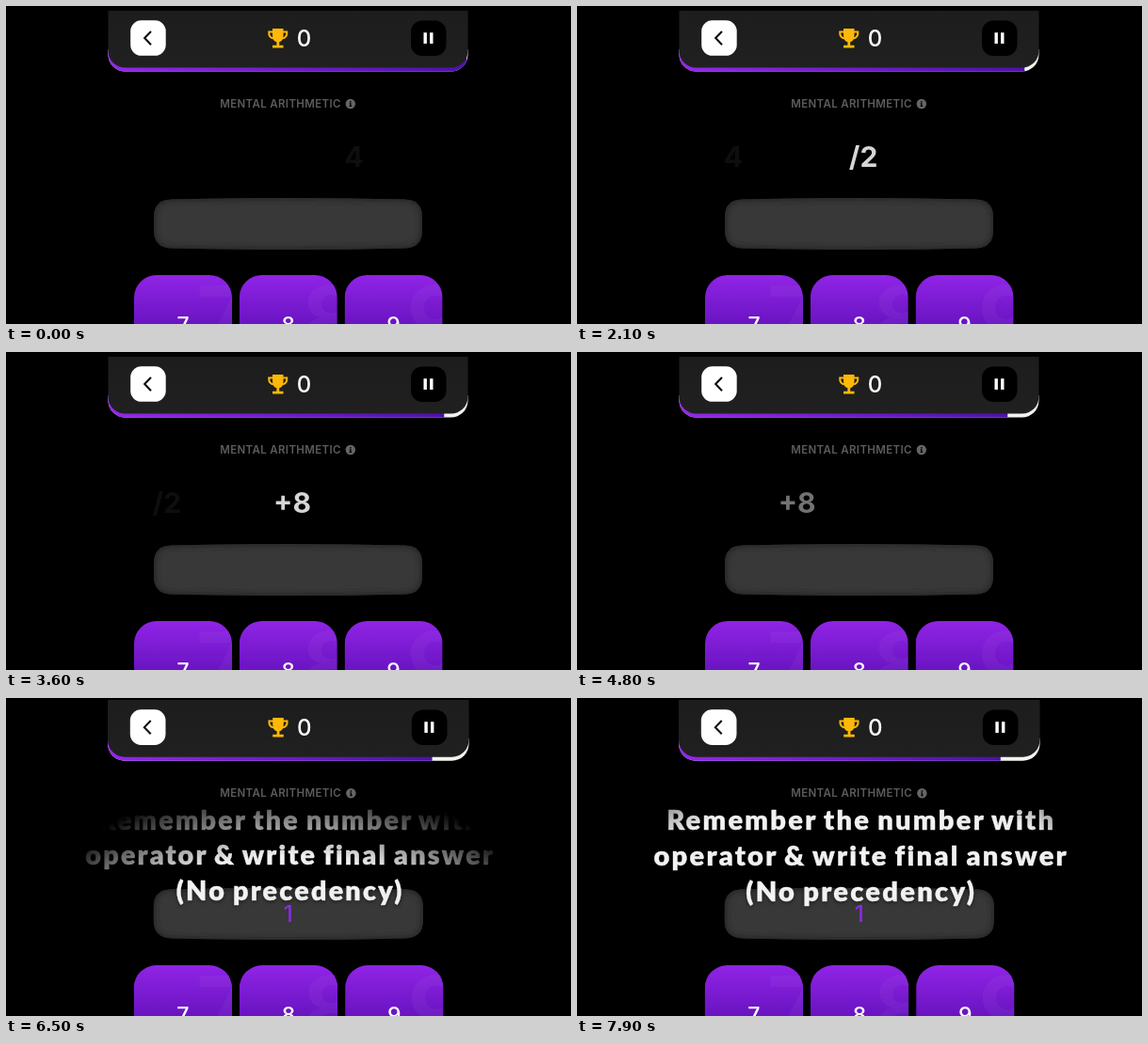
An HTML page for the animation above (8000 ms loop, 600 px wide and 338 px high).

```html
<!DOCTYPE html>
<html lang="en">
<head>
<meta charset="utf-8">
<title>Mental arithmetic</title>
<style>
html, body { margin: 0; width: 100%; height: 100%; overflow: hidden; background: #000; }
svg { display: block; width: 100vw; height: 100vh; font-family: Inter, sans-serif; }
.term { font-size: 30px; font-weight: 700; fill: #e4e4e4; }
.key { font-size: 23px; font-weight: 500; fill: #fff; text-anchor: middle; }
.ghost { font-size: 97px; font-weight: 700; fill: #fff; opacity: .04; }
.caption { font: 900 29px Lato, sans-serif; letter-spacing: 2.3px; word-spacing: -2px; fill: #fff;
  stroke: #fff; stroke-width: .4; text-anchor: middle; text-shadow: 0 1px 4px #0008; }
</style>
</head>
<body>
<svg viewBox="0 0 600 338">
  <defs>
    <linearGradient id="bar"><stop stop-color="#9427e8"/><stop offset="1" stop-color="#4e10ae"/></linearGradient>
    <linearGradient id="panel" x2="0" y2="1"><stop stop-color="#1d1d1d"/><stop offset="1" stop-color="#202020"/></linearGradient>
    <linearGradient id="keyFill" gradientUnits="userSpaceOnUse" x1="0" x2="0" y1="286" y2="390">
      <stop stop-color="#9024e6"/><stop offset=".5" stop-color="#6a14c2"/><stop offset="1" stop-color="#5410a4"/>
    </linearGradient>
    <radialGradient id="reveal" gradientUnits="userSpaceOnUse" cx="300" cy="460" r="245">
      <stop id="solid" stop-color="#fff"/><stop offset="1" stop-color="#fff" stop-opacity="0"/>
    </radialGradient>
    <mask id="wipe" maskUnits="userSpaceOnUse" x="0" y="0" width="600" height="338">
      <rect width="600" height="338" fill="url(#reveal)"/>
    </mask>
    <path id="field" d="M157 224Q157 206 176 205.5Q300 202.5 423 205.5Q442 206 442 224V239Q442 257 423 257.5Q300 260.5 176 257.5Q157 257 157 239Z"/>
    <clipPath id="fieldClip"><use href="#field"/></clipPath>
    <path id="rim" d="M108.5 46V51.5A18 18 0 0 0 126.5 69.5H472.5A18 18 0 0 0 490.5 51.5V46Z"/>
    <clipPath id="rimClip"><use href="#rim"/></clipPath>
    <filter id="soft" x="-10%" y="-30%" width="120%" height="160%"><feGaussianBlur stdDeviation="2.5"/></filter>
  </defs>

  <g id="screen">
    <use href="#rim" fill="#f4f2ee"/>
    <rect id="progress" x="108" y="45" width="381" height="25" fill="url(#bar)" clip-path="url(#rimClip)"/>
    <path d="M108.5 5H490.5V47.5A18 18 0 0 1 472.5 65.5H126.5A18 18 0 0 1 108.5 47.5Z" fill="url(#panel)"/>
    <rect x="132.2" y="15.3" width="37.5" height="37.5" rx="11.5" fill="#fff"/>
    <path d="M154 27L147.2 34.1L154 41.2" fill="none" stroke="#111" stroke-width="2.1"/>
    <g fill="#ffb808">
      <path d="M283 24h11.5v7.5q-.5 7-5.75 7t-5.75-7zM287.4 37.5h2.8v4.3h4.3v2.7h-11.5v-2.7h4.4z"/>
      <path d="M284 27.4h-4.8q-.4 6.6 5.3 7M293.5 27.4h4.8q.4 6.6-5.3 7" fill="none" stroke="#ffb808" stroke-width="2"/>
    </g>
    <text x="316.5" y="43.2" font-size="24" font-weight="500" fill="#fff" text-anchor="middle">0</text>
    <rect x="430" y="15.5" width="37.5" height="37.5" rx="12" fill="#000"/>
    <path d="M443.5 28.3h3.4v11.7h-3.4zM450.1 28.3h3.4v11.7h-3.4z" fill="#fff"/>

    <text x="227.2" y="108.1" font-size="11.5" font-weight="600" letter-spacing=".35" fill="#5c5c5c">MENTAL ARITHMETIC</text>
    <circle cx="365.8" cy="104" r="5.2" fill="#666"/>
    <path d="M365.1 101h1.5v1.4h-1.5zM364.6 103.2h2v2.8h.7v1h-2.8v-1h.7v-1.8h-.6z" fill="#000"/>

    <g id="terms"></g>
    <use href="#field" fill="#383838"/>
    <use href="#field" fill="none" stroke="#262626" stroke-width="5" filter="url(#soft)" clip-path="url(#fieldClip)"/>
    <text id="answer" x="299.5" y="240.5" font-size="24" font-weight="500" fill="#8a2be2" text-anchor="middle">1</text>
    <g id="keys"></g>
  </g>

  <g mask="url(#wipe)">
    <g id="caption" class="caption">
      <text x="301.7" y="139.5">Remember the number with</text>
      <text x="301.7" y="177.5">operator &amp; write final answer</text>
      <text x="301.7" y="215.5">(No precedency)</text>
    </g>
  </g>
</svg>
<script>
const $ = id => document.getElementById(id);
const LOOP = 8000, STEP = 100, CUT = 5300;
const PERIOD = 1500, SLIDE = 850, FIRST = -125, MID = 299.7;
const WIPE = [[CUT, 245], [5700, 308], [6500, 378], [7100, 426], [7900, 452]], SOFT = 85;

const smooth = u => {
  u = Math.min(1, Math.max(0, u));
  return u * u * (3 - 2 * u);
};

function along(points, t) {
  const i = points.findIndex(p => p[0] >= t);
  if (i < 0) return points[points.length - 1][1];
  if (i === 0) return points[0][1];
  const [t0, a] = points[i - 1], [t1, b] = points[i];
  return a + (b - a) * (t - t0) / (t1 - t0);
}

$('keys').innerHTML = [7, 8, 9].map((n, i) => {
  const x = 136 + 111.8 * i;
  return `<clipPath id="k${n}"><rect x="${x}" y="286" width="104" height="104" rx="24"/></clipPath>
    <g clip-path="url(#k${n})"><rect x="${x}" y="286" width="104" height="104" fill="url(#keyFill)"/>
    <text class="ghost" x="${x + 66}" y="367.5">${n}</text>
    <text class="key" x="${x + 52}" y="346.5">${n}</text></g>`;
}).join('');

$('terms').innerHTML = ['4', '/2', '+8'].map(s => `<text class="term" y="170.5">${s}</text>`).join('');
const terms = [...$('terms').children];

// Each term slides in from the right, rests, then leaves to a left-aligned spot.
function placeTerm(el, i, t) {
  const age = t - FIRST - i * PERIOD;
  const enter = smooth(age / SLIDE), leave = smooth((age - PERIOD) / SLIDE);
  const rest = MID - el.getComputedTextLength() / 2;
  el.setAttribute('x', rest + 74 * (1 - enter) + (147.5 - rest) * leave);
  el.setAttribute('opacity', enter * (1 - leave));
}

function draw(t) {
  const slow = t >= CUT;
  $('screen').setAttribute('transform', slow ? 'matrix(1.004 0 0 1.004 -.9 -3.1)' : '');
  const end = 489.3 - Math.min(t, CUT) / 150 - Math.max(0, t - CUT) * .00195;
  $('progress').setAttribute('width', end - 108);
  $('answer').setAttribute('opacity', t >= CUT - 100 ? 1 : 0);
  terms.forEach((el, i) => placeTerm(el, i, t));

  const r = along(WIPE, t);
  $('reveal').setAttribute('r', r);
  $('solid').setAttribute('offset', (r - SOFT) / r);
  const zoom = 1 - .02 * (7900 - t) / 2200;
  $('caption').setAttribute('transform', `translate(300.5 168) scale(${zoom}) translate(-300.5 -168)`);
  $('caption').setAttribute('opacity', slow ? 1 : 0);
}

function tick() {
  draw(Math.floor(performance.now() % LOOP / STEP) * STEP);
  requestAnimationFrame(tick);
}
tick();
</script>
</body>
</html>
```
